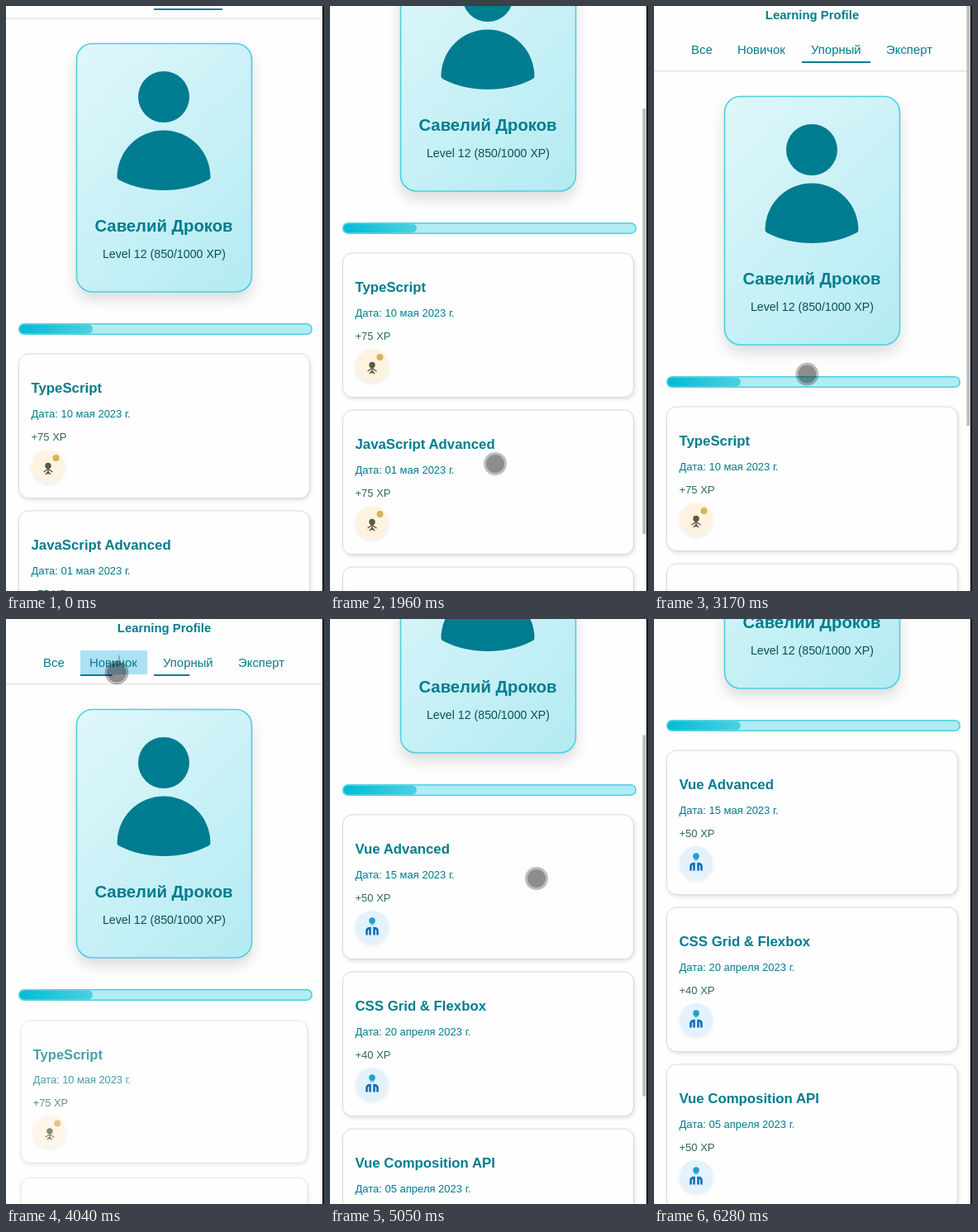
An HTML page that plays this animation: 385x708 px, repeating every 6.74 s.

```html
<!DOCTYPE html>
<html lang="ru">
<head>
<meta charset="utf-8">
<title>Learning Profile</title>
<style>
  html, body { margin: 0; width: 100%; height: 100%; overflow: hidden; background: #fefefe; }
  svg { display: block; width: 385px; height: 708px; }
  text { font-family: "Liberation Sans", Arial, sans-serif; fill: #007c8e; }
  .bold { font-weight: bold; }
  .mid { text-anchor: middle; }
  .tab { font-size: 14.9px; }
  .head { font-size: 16.8px; font-weight: bold; }
  .date { font-size: 13px; }
  .xp { font-size: 13px; fill: #2c6a58; }
  .card { fill: #fefefe; stroke: #d9dadb; filter: drop-shadow(1.5px 2px 2px rgba(0,0,0,.12)); }
  .badge { filter: drop-shadow(0 2px 2px rgba(0,0,0,.08)); }
  .profile { filter: drop-shadow(0 9px 8px rgba(0,0,0,.13)); }
  .header { filter: drop-shadow(0 1px 1px rgba(0,0,0,.15)); }
</style>
</head>
<body>
<svg viewBox="0 0 385 708">
  <defs>
    <linearGradient id="panel" gradientUnits="userSpaceOnUse" x1="63" y1="132" x2="320" y2="388">
      <stop stop-color="#e0f7fa"/><stop offset="1" stop-color="#b2ebf2"/>
    </linearGradient>
    <linearGradient id="level">
      <stop stop-color="#00bcd4"/><stop offset="1" stop-color="#4dd0e1"/>
    </linearGradient>
  </defs>
  <rect width="385" height="708" fill="#fefefe"/>
  <g id="page">
    <rect class="header" x="-5" y="-40" width="395" height="118" fill="#fefefe"/>
    <text class="bold mid" x="191.5" y="16" font-size="14.9">Learning Profile</text>
    <rect id="highlight" x="90" y="38" width="81" height="29" fill="#aee0f4"/>
    <text class="tab" x="45" y="58">Все</text>
    <text class="tab" x="101" y="58">Новичок</text>
    <text class="tab" x="190" y="58">Упорный</text>
    <text class="tab" x="281" y="58">Эксперт</text>
    <rect id="lineNew" x="90" y="67" height="2" fill="#007c91"/>
    <rect id="lineOld" x="179" y="67" height="2" fill="#007c91"/>

    <rect class="profile" x="85.5" y="109.5" width="212" height="300.5" rx="19"
          fill="url(#panel)" stroke="#4dd0e1" stroke-width="1.6"/>
    <g fill="#007c91">
      <circle cx="191" cy="174" r="31"/>
      <path d="M134.5 271A56.5 56.5 0 0 1 247.5 271Q247.5 273.5 244 275C214 291 168 291 138 275Q134.5 273.5 134.5 271Z"/>
    </g>
    <text class="bold mid" x="191" y="337" font-size="20.3">Савелий Дроков</text>
    <text class="mid" x="191.5" y="369" font-size="14.2" style="fill:#0c5054">Level 12 (850/1000 XP)</text>

    <rect x="15.7" y="448.7" width="354.6" height="12.6" rx="6.3" fill="#b2ebf2" stroke="#4dd0e1" stroke-width="1.6"/>
    <rect x="16.5" y="449.6" width="88.5" height="10.8" rx="5.4" fill="url(#level)"/>
    <g id="oldList"></g>
    <g id="newList"></g>
  </g>
  <rect id="thumb" x="378.5" width="4" fill="#bcbcbc"/>
  <rect x="383" width="2" height="708" fill="#1c1c1c"/>
  <path id="beam" d="M137 44V57" stroke="#667c84"/>
  <g id="cursor">
    <circle r="14" fill-opacity=".25"/>
    <circle r="11" fill-opacity=".26"/>
  </g>
</svg>
<script>
const LOOP = 6740;
const el = Object.fromEntries([...document.querySelectorAll('[id]')].map(e => [e.id, e]));
const set = (e, attrs) => { for (const k in attrs) e.setAttribute(k, attrs[k]); };

const brownBadge = `<circle class="badge" cx="51" cy="136" r="20" fill="#fff3e0"/>
  <circle cx="60.5" cy="126" r="4" fill="#d9b25e"/>
  <circle cx="51" cy="135.5" r="3.7" fill="#5a5942"/>
  <path d="M51 138V145.5M45.5 143L50 140H52L56.5 143M48 146L51 142.5L54 146" fill="none" stroke="#5a5942" stroke-width="1.3"/>`;
const blueBadge = `<circle class="badge" cx="51" cy="136" r="20" fill="#e3f2fd"/>
  <circle cx="51" cy="131" r="2.8" fill="#6fd3e6"/>
  <circle cx="51" cy="128" r="3.8" fill="#1ea0cd"/>
  <path d="M44.5 145.5V140Q45 137 48.5 137V145.5M53.5 145.5V137Q57 137 57.5 140V145.5" fill="none" stroke="#0f6fb9" stroke-width="2.6"/>`;

const cardTop = i => 485 + 190 * i;
const cardMarkup = badge => ([title, date, xp]) => `<g>
  <rect class="card" x="15.5" width="352" height="174.5" rx="11.5"/>
  <text class="head" x="30.5" y="47">${title}</text>
  <text class="date" x="30.5" y="77">${date && `Дата: ${date} 2023 г.`}</text>
  <text class="xp" x="30.5" y="105">${xp && `+${xp} XP`}</text>${badge}</g>`;

el.oldList.innerHTML = [
  ['TypeScript', '10 мая', '75'],
  ['JavaScript Advanced', '01 мая', '75'],
  ['', '', '']
].map(cardMarkup(brownBadge)).join('');
el.newList.innerHTML = [
  ['Vue Advanced', '15 мая', '50'],
  ['CSS Grid &amp; Flexbox', '20 апреля', '40'],
  ['Vue Composition API', '05 апреля', '50']
].map(cardMarkup(blueBadge)).join('');

const smooth = u => u * u * (3 - 2 * u);
const easeIn = p => u => u ** p;
const easeOut = p => u => 1 - (1 - u) ** p;
const tween = (t, start, end, from, to, ease = u => u) =>
  from + (to - from) * ease(Math.min(1, Math.max(0, (t - start) / (end - start))));

function scrollAt(t) {
  if (t < 1410) return 64;
  if (t < 2290) return tween(t, 1410, 1960, 81, 186, easeOut(1.2));
  if (t < 4990) return tween(t, 2290, 2770, 175, 0, easeIn(1.22));
  return tween(t, 4990, 5330, 190, 326, easeOut(2.8));
}

function cursorAt(t) {
  const move = (start, end, [x0, y0], [x1, y1], ease) =>
    [tween(t, start, end, x0, x1, ease), tween(t, start, end, y0, y1, ease)];
  const low = [200, 554], tab = [134, 65], list = [250, 314];
  if (t < 2970) return move(330, 475, [278, 637], low, easeOut(1.5));
  if (t < 4390) return move(2970, 3630, low, tab, smooth);
  if (t < 5660) return move(4390, 4720, tab, list, smooth);
  return move(5660, 6270, list, [390, 724], easeIn(1.3));
}

function thumbOpacity(t) {
  if (t < 1410) return 0;
  return t < 4990 ? tween(t, 3270, 3500, 1, 0) : tween(t, 5830, 6050, 1, 0);
}

function showList(list, amount) {
  list.setAttribute('opacity', amount);
  list.style.display = amount > 0 ? '' : 'none';
  const scale = 0.95 + 0.05 * amount;
  [...list.children].forEach((card, i) => set(card, {
    transform: `translate(191.5 ${cardTop(i) + 87}) scale(${scale}) translate(-191.5 -87)`
  }));
}

function draw(t) {
  const scroll = Math.round(scrollAt(t));
  set(el.page, { transform: `translate(0 ${-scroll})` });

  const switched = tween(t, 3910, 4180, 0, 1, smooth);
  set(el.lineNew, { width: 81 * switched });
  set(el.lineOld, { width: 83 * (1 - switched) });
  set(el.highlight, { opacity: +(t >= 3760 && t < 4200) });
  set(el.beam, { opacity: +(t >= 3690 && t < 4450) });
  showList(el.oldList, tween(t, 3910, 4290, 1, 0, smooth));
  showList(el.newList, tween(t, 4350, 4720, 0, 1, smooth));

  const [ratio, height] = t < 4390 ? [0.705, 515] : [0.595, 437];
  set(el.thumb, { y: scroll * ratio - 7, height, opacity: thumbOpacity(t) });

  const pressed = t >= 3690 && t < 4110;
  set(el.cursor, {
    transform: `translate(${cursorAt(t)})`,
    opacity: +(t >= 330 && t < 6280),
    stroke: pressed ? 'rgba(0,0,0,.2)' : 'none'
  });
}

function frame() {
  draw(performance.now() % LOOP);
  requestAnimationFrame(frame);
}
frame();
</script>
</body>
</html>
```
